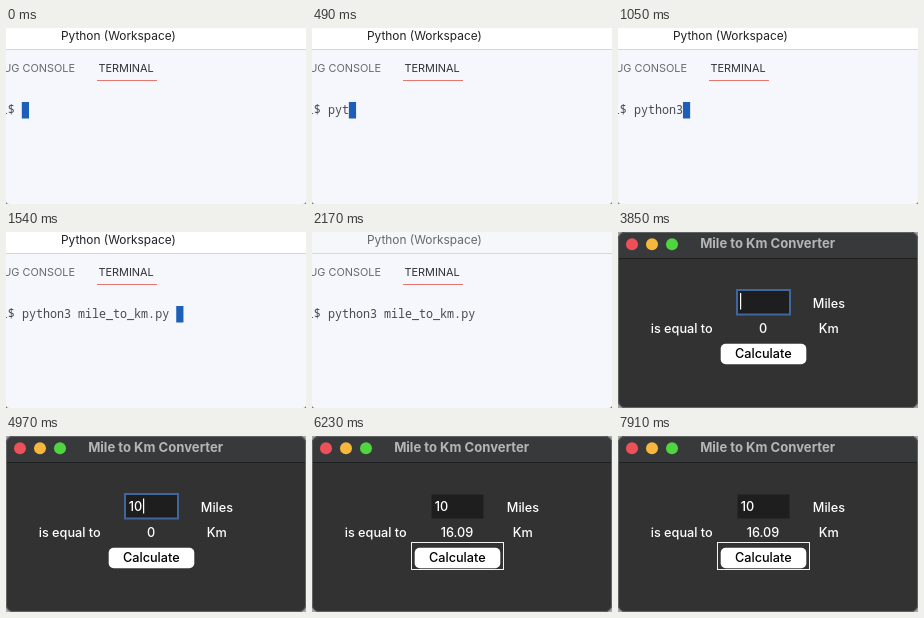
These frames come from a looping animation (300x176 px, 8 s). An HTML page:

```html
<!DOCTYPE html>
<html lang="en">
<head>
<meta charset="utf-8">
<title>Mile to Km Converter</title>
<style>
  html, body { margin: 0; width: 100%; height: 100%; overflow: hidden; background: #686868; }
  svg { display: block; width: 300px; height: 176px; }
  text { font-family: Inter, Roboto, sans-serif; white-space: pre; }
  .mono { font: 11.7px "Noto Sans Mono", "DejaVu Sans Mono", monospace; fill: #464a50; }
  .tab { font-size: 10.9px; }
  .app text { font-size: 12.7px; font-weight: 500; fill: #fff; }
  .app .title { font-size: 13.1px; font-weight: 700; fill: #b4b5b6; }
  .mid { text-anchor: middle; }
</style>
</head>
<body>
<svg viewBox="0 0 300 176">
  <defs>
    <clipPath id="win"><rect y="-8" width="300" height="184" rx="3"/></clipPath>
    <clipPath id="appWin"><rect width="300" height="176" rx="7"/></clipPath>
  </defs>
  <g id="terminal" clip-path="url(#win)">
    <rect width="300" height="176" fill="#f5f7fc"/>
    <rect id="bar" width="300" height="21" fill="#fff"/>
    <rect y="21" width="300" height="1" fill="#d6d7da"/>
    <text id="wsTitle" class="mid" x="112.4" y="12.3" font-size="11.9">Python (Workspace)</text>
    <text class="tab" x="69" y="44" text-anchor="end" fill="#686a6e">DEBUG CONSOLE</text>
    <text class="tab" x="92.5" y="44" fill="#303236">TERMINAL</text>
    <rect x="91" y="52" width="60" height="1" fill="#e5756d"/>
    <text class="mono" x="-5.2" y="86">l$</text>
    <text id="command" class="mono" x="15.9" y="86"></text>
    <rect id="cursor" y="74" width="7.2" height="16.5" fill="#1d5fb8"/>
  </g>
  <g id="app" class="app">
    <rect width="300" height="176" fill="#a4a5a8"/>
    <g clip-path="url(#appWin)">
      <rect width="300" height="176" fill="#323232"/>
      <rect width="300" height="26" fill="#37393b"/>
      <rect y="26" width="300" height="1" fill="#1c1e1f"/>
      <rect x=".5" y=".5" width="299" height="175" rx="6.5" fill="none" stroke="#626365"/>
      <circle cx="14" cy="12.2" r="6" fill="#ed5059"/>
      <circle cx="34" cy="12.2" r="6" fill="#f5b83d"/>
      <circle cx="54" cy="12.2" r="6" fill="#4fd540"/>
      <text class="title mid" x="149.6" y="16.3">Mile to Km Converter</text>
      <rect x="119.5" y="58.5" width="52" height="24" fill="#1e1e1e"/>
      <rect id="entryRing" x="119" y="58" width="53" height="24.5" fill="none" stroke="#3f679c" stroke-width="2"/>
      <text id="entry" x="122.7" y="75.3"></text>
      <rect id="caret" width="1.2" fill="#fff"/>
      <text x="194.8" y="76">Miles</text>
      <text x="32.7" y="101">is equal to</text>
      <text id="result" class="mid" x="145" y="101">0</text>
      <text x="200.8" y="101">Km</text>
      <rect id="buttonRing" x="99.5" y="106.5" width="92" height="27" fill="none" stroke="#f2f2f2"/>
      <rect x="102.7" y="111.7" width="85.6" height="20.5" rx="5" fill="#fff"/>
      <text class="mid" x="145.3" y="126.3" style="fill:#000">Calculate</text>
    </g>
  </g>
</svg>
<script>
const LOOP = 8000;
const COMMAND = "python3 mile_to_km.py ";
const KEYS = [280, 350, 490, 630, 700, 840, 1050, 1260, 1400];
const COMPLETE = 1540, ENTER = 1960, BLUR = 2170, OPEN = 2240;
const FOCUS = 3850, DIGITS = [4830, 4970], TAB = 5950, CALCULATE = 6230;
const ADVANCE = 7.02;

const $ = id => document.getElementById(id);
const show = (id, on) => $(id).setAttribute("visibility", on ? "visible" : "hidden");
const within = (t, from, to) => t >= from && t < to;
const count = (times, t) => times.filter(at => t >= at).length;

function drawTerminal(t) {
  const typed = t >= COMPLETE ? COMMAND.length : count(KEYS, t);
  $("command").textContent = COMMAND.slice(0, typed);
  $("cursor").setAttribute("x", 15.8 + typed * ADVANCE);
  show("cursor", t < ENTER);
  const active = t < BLUR;
  $("bar").setAttribute("fill", active ? "#fff" : "#f6f7fa");
  $("wsTitle").setAttribute("fill", active ? "#202124" : "#66686c");
}

function drawApp(t) {
  const digits = count(DIGITS, t);
  const caretOn = within(t, FOCUS, 4480) || within(t, DIGITS[0], 5460) || within(t, 5740, TAB);
  $("entry").textContent = "10".slice(0, digits);
  $("caret").setAttribute("x", [122, 128.6, 137][digits]);
  $("caret").setAttribute("y", digits ? 62.5 : 61);
  $("caret").setAttribute("height", digits ? 15 : 16.5);
  show("caret", caretOn);
  show("entryRing", within(t, FOCUS, TAB));
  show("buttonRing", t >= TAB);
  $("result").textContent = t >= CALCULATE ? "16.09" : "0";
}

function draw(t) {
  const open = t >= OPEN;
  $("terminal").style.display = open ? "none" : "";
  $("app").style.display = open ? "" : "none";
  if (open) drawApp(t);
  else drawTerminal(t);
}

let start;
function tick(now) {
  start ??= now;
  draw(Math.max(0, now - start) % LOOP);
  requestAnimationFrame(tick);
}
draw(0);
requestAnimationFrame(tick);
</script>
</body>
</html>
```
